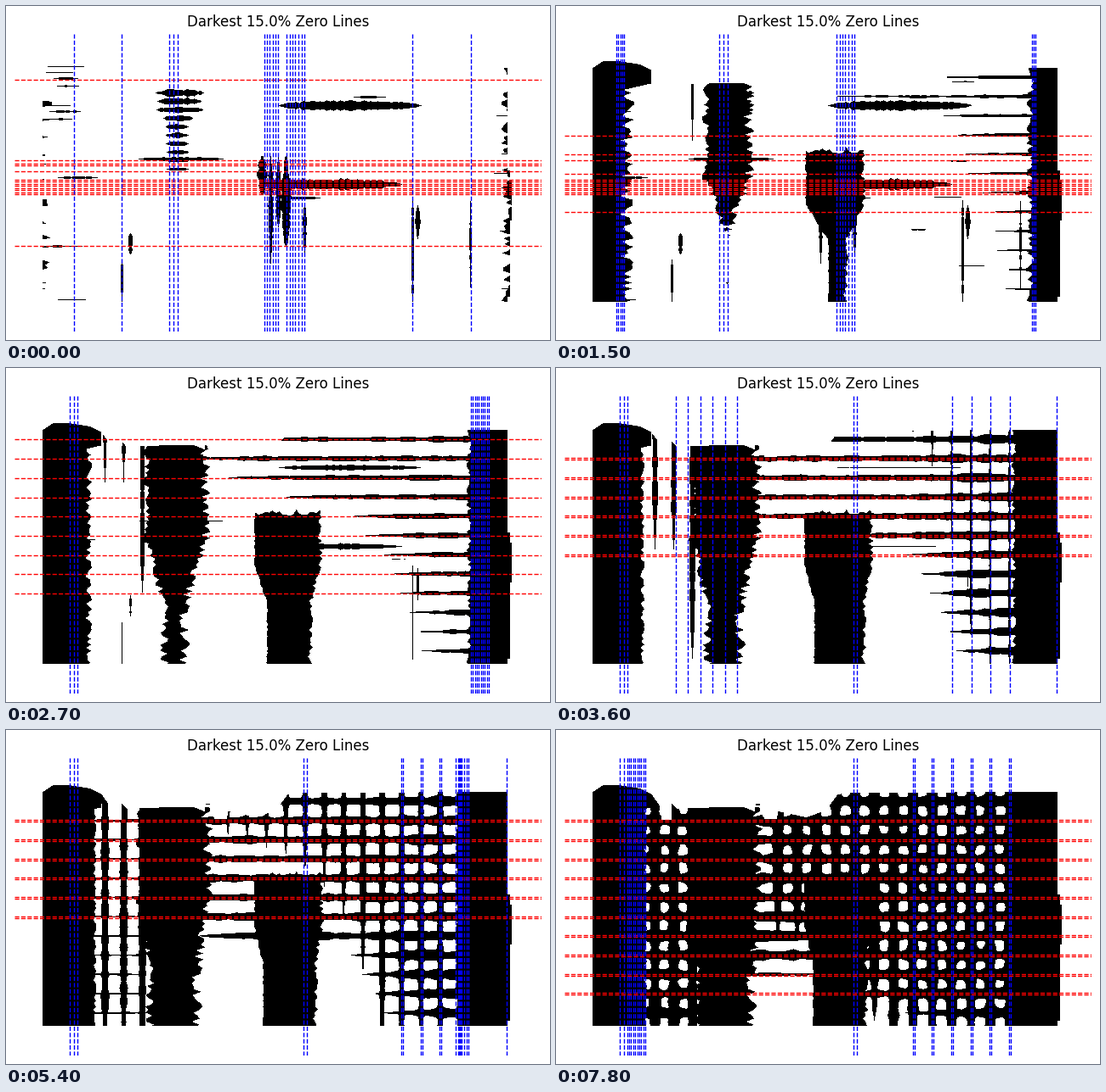
A matplotlib script that plays this animation: 640 px wide and 394 px high, repeating every 8000 ms.

```python
import numpy as np
import matplotlib.pyplot as plt
from matplotlib.animation import FuncAnimation

W, H, DPI = 640, 394, 100
X = np.arange(10, 630)
Y = np.arange(33, 384)
LAST = 26
PITCH = 22.7
BAR_Y = 84.5 + PITCH * np.arange(12)
POST_X = 534 - PITCH * np.arange(13)

# Key points of the roof line
ROOF = ((44, 74), (56, 66), (74, 66), (100, 70), (113, 77), (123, 91), (125, 107),
        (136, 107), (137, 88), (143, 94), (219, 91), (234, 97), (236, 88), (240, 88),
        (241, 98), (246, 106), (260, 106), (262, 97), (295, 104), (318, 96), (332, 77),
        (345, 75), (595, 74))

# Groups of vertical guides: from x, to x, count, first step, end step
GUIDE_GROUPS = (
    (80, 136, 2, 0, 3), (192, 202, 3, 0, 9), (304, 320, 6, 0, 4), (330, 351, 7, 0, 8),
    (478, 547, 2, 0, 3), (71, 80, 5, 3, 7), (560, 564, 3, 4, 7), (75, 84, 3, 7, 27),
    (547, 568, 10, 7, 12), (141, 213, 6, 12, 16), (529, 544, 7, 16, 20),
    (589, 589, 1, 12, 20), (86, 105, 9, 20, 27), (350, 354, 2, 12, 27),
)


def grow(step, start, end, tau):
    """Ease from start towards end."""
    return end + (start - end) * np.exp(-step / tau)


def noise(axis, seed, period):
    """Smooth noise in -1..1 along an axis."""
    knots = np.arange(axis[0], axis[-1] + period, period)
    return np.interp(axis, knots, np.random.default_rng(seed).uniform(-1, 1, len(knots)))


def falloff(axis, centre):
    return (np.abs(axis - centre) + .5) ** -4.0


def spindle(axis, start, end, half, seed):
    u = np.clip((axis - start) / (end - start), 0, 1)
    return half * (4 * u * (1 - u)) ** .5 * (1 + .25 * noise(axis, seed, 4))


def silhouette():
    roof = np.round(np.interp(X, *zip(*ROOF)))
    side = np.select([Y < 195, Y < 207, Y < 254, Y < 344], [590, 593, 595, 593], 590)
    return (X >= 44) & (X <= side[:, None]) & (Y[:, None] >= roof) & (Y[:, None] <= 349)


def slab(left, right, top=0):
    return (X >= left[:, None]) & (X <= right[:, None]) & (Y[:, None] >= top)


def slabs(step):
    def edge(upper, lower, amp, seed, span=(205, 275)):
        base = np.interp(Y, span, (grow(step, *upper), grow(step, *lower)))
        return base + amp * noise(Y, seed, 3.5)

    flat = np.zeros(len(Y))
    wall = (30, 106, 4)
    west = edge(wall, wall, grow(step, 26, 1.5, 4), 1)
    if step >= 3:
        west = np.maximum(west, np.interp(Y, (92, 104), (112, 60)))
    column = slab(edge((212, 156, 5), (250, 163, 7), 5, 2),
                  edge((185, 238, 3), (170, 234, 9), 7, 3), 92)
    pillar = slab(edge((330, 293, 1.5), (400, 303, 3), 1, 4, (235, 278)),
                  edge((298, 372, 2.5), (240, 365, 3), 3, 5, (235, 278)),
                  171 + 4 * noise(X, 6, 4))
    wall = (590, 528, 7)
    east = edge(wall, wall, grow(step, 7, 1, 9), 7)
    return slab(flat, west) | column | pillar | slab(east, flat + W)


def bars(step):
    """Horizontal bars reach out from the east wall and bridge the gap in turn."""
    field = np.zeros((len(Y), len(X)))
    bulge = .5 * np.exp(-((step - 14) / 4.5) ** 2)
    gain = 1 + bulge * np.clip((X - 420) / 50, 0, 1)
    for i, y in enumerate(BAR_Y):
        bridged = 9 + .19 * i * i
        reach = np.clip((step - 3) / max(bridged - 6, 3), 0, 1) ** .5
        span = np.clip((step - bridged + 3) / 3.5, 0, 1)
        start = 560 - 160 * reach - 230 * span
        half = (1.4 + .18 * step) * gain * np.clip((X - start) / 70, 0, 1) ** .7
        if y > 275:
            half = np.where((X > 220) & (X < 305), half * .35, half)
        half = np.where((X > 100) & (X < 165), np.clip(.7 * (step - 16), 0, 5.8), half)
        half = half * (1 + .28 * noise(X, 40 + i, 9))
        field += np.outer(falloff(Y, y), half ** 4)
    return field


def posts(step):
    """Vertical posts drop from the roof, slower the further west they stand."""
    field = np.zeros((len(Y), len(X)))

    def drop(x, half, bottom):
        taper = np.clip((bottom - Y) / 55, 0, 1) ** .6
        width = half * taper * (1 + .25 * noise(Y, int(x), 8))
        return np.outer(width ** 4, falloff(X, x))

    for j, x in enumerate(POST_X):
        speed = 14 + 340 * np.exp(-j / 1.7)
        field += drop(x, max(.33 * step - 2.4, 0), 60 + speed * (step - 9 - .35 * j))
    for m in range(3):
        field += drop(161 - 22 * m, 1 + .2 * step, 60 + 26 * (step - min(1 + 5 * m, 6)))
    return field


def streaks(step):
    """Loose strokes of the first steps, which fade as the lattice forms."""
    field = np.zeros((len(Y), len(X)))
    rng = np.random.default_rng(12)
    early = np.clip((13 - step) / 7, 0, 1)
    passing = np.clip(1 - abs(step - 6) / 5, 0, 1)

    def across(x0, x1, y, half, gain=early):
        width = gain * spindle(X, x0, x1, half, int(y))
        return np.outer(falloff(Y, y), width ** 4)

    def upright(y0, y1, x, half):
        width = early * spindle(Y, y0, y1, half, x)
        return np.outer(width ** 4, falloff(X, x))

    for y in (72, 79, 86, 95, 118, 125, 134, 203, 284, 347):
        x0 = rng.uniform(42, 62)
        field += across(x0, x0 + rng.uniform(28, 50), y, rng.uniform(.7, 2))
    for i, y in enumerate(np.arange(103, 200, 10)):
        reach = rng.uniform(16, 38) if i < 4 else 16
        field += across(200 - .7 * reach, 200 + reach, y, 4.5 - .25 * i)
    field += across(155, 258, 181, 2.6)
    field += across(320, 490, 118, 6.2) + across(298, 467, 211, 6.5)
    field += across(408, 449, 108, 1.6) + across(330, 371, 227, 2)
    field += across(328, 492, 107, 2, passing)
    for y in rng.uniform(85, 320, 7):
        x0 = rng.uniform(390, 480)
        field += across(x0, x0 + 35, y, 1.5, passing)

    for i, x in enumerate((302, 312, 321, 330)):
        field += upright(177, (224, 305, 262, 285)[i], x, 3 + 2.5 * (i % 3 == 0))
    for x, y0, y1, half in ((137, 299, 352, 2.2), (147, 268, 294, 3), (352, 234, 292, 2.6),
                            (479, 228, 352, 2.2), (485, 235, 276, 3), (547, 228, 335, 1.7)):
        field += upright(y0, y1, x, half)
    return field


def picture(step):
    field = bars(step) + posts(step) + streaks(step)
    black = (slabs(step) | (field >= 1)) & silhouette()
    return np.where(black, 0, 255).astype(np.uint8)


def pairs(values):
    return [v + d for v in values for d in (-1, 1)]


def row_guides(step):
    if step < 9:
        first = (87, 182, 186, 188, 195, 283)
        loose = first if step < 3 else (182, *BAR_Y[[3, 4, 5, 7]])
        return [*np.linspace(205, 222, 8), *loose]
    if step < 12:
        return list(BAR_Y[:9])
    return pairs(BAR_Y[1:int(np.interp(step, (14, 18, 26), (7, 7, 11)))])


def column_guides(step):
    xs = []
    for x0, x1, count, first, end in GUIDE_GROUPS:
        if first <= step < end:
            xs += list(np.linspace(x0, x1, count))
    if step >= 12:
        lattice = POST_X[:4 + max(step - 18, 0) // 4]
        xs += pairs(lattice) if step >= 18 else list(lattice)
    return xs


fig = plt.figure(figsize=(W / DPI, H / DPI), dpi=DPI, facecolor="white")
ax = fig.add_axes((10 / W, 10 / H, 620 / W, 351 / H))
ax.set_title("Darkest 15.0% Zero Lines", fontsize=12, fontfamily="DejaVu Sans", pad=6.7)
pictures = [picture(step) for step in range(LAST + 1)]
image = ax.imshow(pictures[0], cmap="gray", vmin=0, vmax=255, aspect="auto",
                  interpolation="nearest", extent=(9, 629, 383, 32))
ax.set(xlim=(10, 630), ylim=(384, 33))
ax.axis("off")
guides = []


def update(frame):
    step = min(frame // 3, LAST)
    image.set_data(pictures[step])
    while guides:
        guides.pop().remove()
    for y in row_guides(step):
        guides.append(ax.axhline(round(y) + .5, color="red", ls="--", lw=1))
    for x in column_guides(step):
        guides.append(ax.axvline(round(x) - .5, color="blue", ls="--", lw=1))
    return [image, *guides]


anim = FuncAnimation(fig, update, frames=80, interval=100, repeat=True, repeat_delay=0)
plt.show()
```
